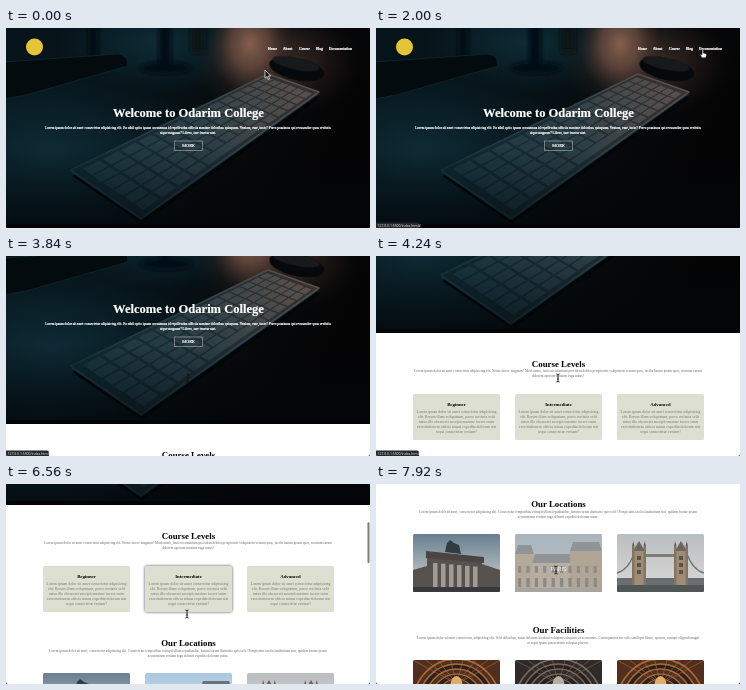
Recreate the animation shown at these times as an HTML page. Size 364 px wide and 200 px high, loop 8 s.

```html
<!DOCTYPE html>
<html lang="en">
<head>
<meta charset="utf-8">
<title>College landing page</title>
<style>
  html, body { margin: 0; width: 100%; height: 100%; overflow: hidden; background: #222; }
  svg { display: block; width: 100vw; height: 100vh; }
  text { font-family: "Liberation Serif", "Times New Roman", serif; text-anchor: middle; }
  .bold { font-weight: 700; }
  .start { text-anchor: start; }
  .sans { font-family: "Open Sans", "Noto Sans", sans-serif; }
  .lit text { stroke: #fff; stroke-width: .18; }
</style>
</head>
<body>
<svg id="stage" viewBox="0 0 364 200" xmlns="http://www.w3.org/2000/svg">
  <defs>
    <linearGradient id="desk" x2="1" y2=".3">
      <stop offset="0" stop-color="#05151b"/><stop offset=".5" stop-color="#061116"/>
      <stop offset=".8" stop-color="#070809"/><stop offset="1" stop-color="#040405"/>
    </linearGradient>
    <radialGradient id="teal"><stop stop-color="#0e2b35"/><stop offset="1" stop-color="#0e2b35" stop-opacity="0"/></radialGradient>
    <radialGradient id="warm"><stop stop-color="#85604f"/><stop offset=".45" stop-color="#6b4c40" stop-opacity=".75"/><stop offset="1" stop-color="#3a2a25" stop-opacity="0"/></radialGradient>
    <linearGradient id="floor" x2="0" y2="1"><stop offset=".6" stop-color="#02060a" stop-opacity="0"/><stop offset="1" stop-color="#02060a" stop-opacity=".6"/></linearGradient>
    <linearGradient id="board" gradientUnits="userSpaceOnUse" x1="90" y1="170" x2="290" y2="55">
      <stop stop-color="#0f2830"/><stop offset=".55" stop-color="#1d2d33"/><stop offset="1" stop-color="#37302d"/>
    </linearGradient>
    <linearGradient id="keys" gradientUnits="userSpaceOnUse" x1="90" y1="170" x2="290" y2="55">
      <stop stop-color="#173540"/><stop offset=".55" stop-color="#2d3f46"/><stop offset="1" stop-color="#57504d"/>
    </linearGradient>
    <linearGradient id="dusk" x2="0" y2="1"><stop stop-color="#687f90"/><stop offset=".6" stop-color="#aab4ba"/><stop offset="1" stop-color="#c9c2b8"/></linearGradient>
    <linearGradient id="blue" x2="0" y2="1"><stop stop-color="#a9c8df"/><stop offset="1" stop-color="#dde5e8"/></linearGradient>
    <linearGradient id="cloud" x2="0" y2="1"><stop stop-color="#b9bec1"/><stop offset="1" stop-color="#dcdad6"/></linearGradient>
    <filter id="soft"><feGaussianBlur stdDeviation=".5"/></filter>
    <filter id="blur" x="-20%" y="-20%" width="140%" height="140%"><feGaussianBlur stdDeviation="2"/></filter>
    <filter id="shadow" x="-10%" y="-20%" width="120%" height="140%"><feGaussianBlur stdDeviation="1.5"/></filter>
    <clipPath id="hero"><rect width="364" height="200"/></clipPath>
    <clipPath id="frame"><rect width="87" height="58" rx="1.5"/></clipPath>
    <clipPath id="window"><path d="M0 0H364V198Q364 200 362 200H2Q0 200 0 198Z"/></clipPath>
  </defs>
  <g clip-path="url(#window)">
    <rect width="364" height="200" fill="#fff"/>
    <g id="page"></g>
    <rect id="bar" x="361.5" width="2" height="41" rx="1" fill="#7d7d7d"/>
    <g id="status">
      <path d="M0 194.5H41Q43 194.5 43 196.5V200H0Z" fill="#25292d"/>
      <text class="start sans" x="1.5" y="198.6" font-size="3.4" fill="#f0f0f0">127.0.0.1:5500/index.html#</text>
    </g>
    <g id="cursor">
      <path id="arrow" d="M0 0V8.2L1.9 6.5 3.2 9.5 4.6 8.9 3.3 6H5.8Z" fill="#111" stroke="#fff" stroke-width=".7"/>
      <path id="hand" d="M-.6.4Q0-.6.7.4V3.2L3.4 3.9Q4 4.3 3.7 5.6L3 8H-.8L-2.4 4.9Q-2.2 4-.6 5Z" fill="#fff" stroke="#111" stroke-width=".5"/>
      <path id="beam" d="M-1.6-4Q0-4 0-3 0-4 1.6-4M0-3V3M-1.6 4Q0 4 0 3 0 4 1.6 4M-.8 1H.8" fill="none" stroke="#111" stroke-width=".9"/>
    </g>
  </g>
</svg>
<script>
const $ = id => document.getElementById(id);
const columns = [37, 139, 241];
const rect = (x, y, w, h, fill, more = '') => `<rect x="${x}" y="${y}" width="${w}" height="${h}" fill="${fill}" ${more}/>`;
const path = (d, fill, more = '') => `<path d="${d}" fill="${fill}" ${more}/>`;
const oval = (x, y, rx, ry, fill, more = '') => `<ellipse cx="${x}" cy="${y}" rx="${rx}" ry="${ry}" fill="${fill}" ${more}/>`;
const text = (x, y, size, fill, words, cls = '') => `<text x="${x}" y="${y}" font-size="${size}" fill="${fill}" class="${cls}">${words}</text>`;
const lines = (x, y, size, pitch, fill, rows) => rows.map((row, i) => text(x, y + i * pitch, size, fill, row)).join('');
const repeat = (n, draw) => Array.from({ length: n }, (_, i) => draw(i)).join('');
const mix = (a, b, k) => a.map((v, i) => v + (b[i] - v) * k);

// u runs from the near end to the far end, v across the rows.
function onBoard(u, v) {
  const depth = 1.6 * u / (1 + .6 * u);
  return mix(mix([65, 142], [135, 190], v), mix([262, 46], [313, 64], v), depth);
}

const patch = (u, v, w, h) =>
  'M' + [onBoard(u, v), onBoard(u + w, v), onBoard(u + w, v + h), onBoard(u, v + h)].join('L') + 'Z';

function keyboard() {
  const body = patch(0, 0, 1, 1);
  const keys = repeat(6, r => repeat(14, c => r === 5 && c > 3 && c < 9 ? '' : patch(.025 + c * .068, .06 + r * .15, .057, .125)));
  return `<g filter="url(#soft)">
    ${path(body, '#020608', 'transform="translate(1 6)"')}
    ${path(body, '#1c3a43', 'transform="translate(0 2)"')}
    ${path(body, 'url(#board)', 'stroke="url(#keys)" stroke-width="1.5" stroke-linejoin="round"')}
    ${path(keys + patch(.297, .81, .329, .125), 'url(#keys)')}</g>`;
}

function desk() {
  return rect(0, 0, 364, 200, 'url(#desk)')
    + oval(45, 125, 150, 85, 'url(#teal)') + oval(150, 15, 100, 50, 'url(#teal)')
    + oval(270, 35, 85, 55, 'url(#warm)', 'opacity=".4"') + oval(244, 16, 42, 52, 'url(#warm)')
    + `<g filter="url(#blur)">${rect(82, -5, 10, 35, '#041015')}${rect(153, -5, 12, 42, '#041015')}
       ${oval(160, 40, 26, 6, '#041015')}${rect(185, -5, 14, 30, '#071216')}</g>`
    + `<g filter="url(#soft)">${path('M-2 34L112 26Q122 27 122 38L20 67 -2 71Z', '#030b0f', 'stroke="#10272f" stroke-width=".8"')}</g>`
    + keyboard()
    + `<g filter="url(#soft)" transform="rotate(12 291 40)">${oval(291, 41, 28, 11, '#05090c')}${oval(289, 36, 24, 6, '#17191b')}</g>`
    + rect(0, 0, 364, 200, 'url(#floor)') + rect(0, 196, 364, 4, '#020406');
}

function hero() {
  const nav = [['Home', 262], ['About', 277], ['Course', 293], ['Blog', 310], ['Documentation', 323]];
  return `<g clip-path="url(#hero)">${desk()}</g>`
    + '<circle cx="28.5" cy="19" r="8.5" fill="#e5c437"/><g class="lit">'
    + nav.map(([label, x]) => text(x, 22.2, 3.5, '#fff', label, 'bold start')).join('')
    + text(182.5, 89.3, 12.56, '#fff', 'Welcome to Odarim College', 'bold')
    + lines(182, 101.2, 3.46, 5, '#fff', [
      'Lorem ipsum dolor sit amet consectetur adipisicing elit. Ea nihil optio ipsum accusamus id repellendus officiis maxime doloribus quisquam. Veniam, esse, iusto? Porro possimus qui recusandae quas veritatis',
      'atque magnam? Libero, iure tenetur sint.'])
    + rect(168.5, 113, 28, 9.5, 'none', 'stroke="#ccc" stroke-width=".5"')
    + text(182.5, 119.2, 4.3, '#fff', 'MORE') + '</g>';
}

const section = (y, title, rows) => text(182.5, y, 8.85, '#000', title, 'bold') + lines(182, y + 5.3, 3.46, 5, '#666', rows);

function card(x, i) {
  return (i === 1 ? `<g id="lift">${rect(x, 261, 87, 46, '#444', 'rx="2" filter="url(#shadow)"')}</g>` : '')
    + rect(x, 261, 87, 46, '#dddfd1', 'rx="1.5"')
    + text(x + 43.5, 272.6, 4.8, '#000', ['Beginner', 'Intermediate', 'Advanced'][i], 'bold')
    + lines(x + 43.5, 280, 3.9, 5, '#777', [
      'Lorem ipsum dolor sit amet consectetur adipisicing',
      'elit. Rerum illum voluptatum, porro veritatis velit',
      'natus illo obcaecati suscipit maxime facere enim',
      'exercitationem officia minus expedita dolorum nisi',
      'sequi consectetur veniam?']);
}

const photo = (x, y, art) => `<g transform="translate(${x} ${y})" clip-path="url(#frame)">${art}</g>`;

function gate() {
  return rect(0, 0, 87, 58, 'url(#dusk)')
    + path('M0 58V36L14 32V22L17 19 69 25V30L87 36V58Z', '#57514e')
    + repeat(6, i => rect(20 + i * 8, 29 + i * .7, 4.5, 25, '#a39c96'))
    + path('M13 17L71 23V29L13 24Z', '#4a4543') + path('M32 18L34 9 37 6 41 9 46 11 48 20Z', '#303d40')
    + rect(0, 53, 87, 5, '#37393c');
}

function palace() {
  const wing = (x, y, w, color) => path(`M${x} ${y + 9}L${x + 3} ${y}H${x + w - 3}L${x + w} ${y + 9}Z`, '#69727a') + rect(x, y + 9, w, 50, color);
  return rect(0, 0, 87, 58, 'url(#blue)') + wing(0, 11, 19, '#c5ac84') + wing(17, 20, 49, '#cfb993') + wing(55, 8, 32, '#bd9f75')
    + repeat(10, i => rect(3 + i * 8.4, 32, 3.2, 7, '#665b50') + rect(3 + i * 8.4, 44, 3.2, 9, '#5b5149'))
    + rect(0, 54, 87, 4, '#a69c90')
    + `<g id="veil">${rect(0, 0, 87, 58, '#aaa', 'opacity=".62"')}${text(43.5, 37, 6, '#fff', 'PARIS', 'sans')}</g>`;
}

function bridge() {
  const tower = x => rect(x, 17, 14, 42, '#a08d76') + path(`M${x + 1} 17L${x + 7} 7 ${x + 13} 17Z`, '#6a6762')
    + repeat(2, i => rect(x + i * 11.5, 12, 2.5, 46, '#85745f') + path(`M${x + i * 11.5} 12l1.2-5 1.3 5Z`, '#66615b'))
    + repeat(3, i => rect(x + 5, 22 + i * 7, 4, 4, '#5c5349'));
  return rect(0, 0, 87, 58, 'url(#cloud)') + path('M0 58V47H87V58Z', '#69706f')
    + rect(28, 20, 31, 3, '#7d7d78') + rect(0, 44, 87, 3, '#666c70')
    + path('M0 39Q11 36 17 20M70 20Q76 36 87 39', 'none', 'stroke="#667880" stroke-width="1.3"')
    + tower(15) + tower(57) + rect(0, 51, 87, 7, '#4f5655');
}

function hall(dark) {
  const [back, rib, glow] = dark ? ['#302b29', '#756960', '#b6aca0'] : ['#522e1c', '#a66c3e', '#e0ac6b'];
  return rect(0, 0, 87, 58, back)
    + repeat(6, i => oval(43.5, 45 - i, 44 - i * 6, 46 - i * 6, i % 2 ? '#2c201a' : back, `stroke="${rib}" stroke-width="${1.7 - i * .15}"`))
    + repeat(8, i => path(`M43.5 24L${i * 12.5} 0`, 'none', `stroke="${rib}" stroke-width=".6"`))
    + oval(43.5, 25, 6, 9, glow);
}

$('page').innerHTML = hero()
  + section(234, 'Course Levels', [
    'Lorem ipsum dolor sit amet consectetur adipisicing elit. Nemo facere magnam? Modi nemo, iusto accusantium provident debitis perspiciatis voluptatem veniam quas, facilis harum ipsam quos, nostrum earum',
    'dolorem aperiam maxime fuga natus?'])
  + columns.map(card).join('')
  + section(341.2, 'Our Locations', [
    'Lorem ipsum dolor sit amet, consectetur adipisicing elit. Consectetur temporibus corrupti ullam repudiandae, harum earum distinctio quis velit! Perspiciatis facilis laudantium sint, quidem beatae ipsam',
    'accusantium veniam fuga deleniti expedita dolorum natus.'])
  + [gate, palace, bridge].map((art, i) => photo(columns[i], 368, art())).join('')
  + section(467.2, 'Our Facilities', [
    'Lorem ipsum dolor sit amet consectetur, adipisicing elit. Velit doloribus, natus dolorum incidunt voluptates aliquam sit accusamus. Consequuntur iste odio similique libero, quaerat, cumque eligendi magni',
    'ut sequi ipsam praesentium voluptas placeat.'])
  + columns.map((x, i) => photo(x, 494, hall(i === 1))).join('');

// Each track is a list of [time, ...values].
const scroll = [[3680, 0], [3760, 6], [3840, 32], [3920, 70], [4000, 100], [4080, 118], [4160, 118], [4240, 123], [4400, 148],
  [4560, 168], [4640, 171], [6320, 171], [6400, 173], [6560, 179], [6640, 195], [6800, 258], [6960, 300], [7120, 316], [7200, 318]];
const pointer = [[160, 259, 42], [1040, 272, 22], [1120, 273, 21], [1920, 334, 21], [2400, 290, 26], [2960, 234.5, 58],
  [3680, 182, 122], [4720, 182, 122], [4960, 182.5, 103], [5520, 182.5, 103], [6320, 181, 130], [7200, 181, 130], [7600, 180, 86]];
const shapes = [[0, 'arrow'], [1040, 'hand'], [2160, 'arrow'], [3680, 'beam'], [4800, 'arrow'], [6240, 'beam']];
const lift = [[4240, 0], [4480, 1], [6560, 1], [6720, 0]];
const veil = [[7120, 0], [7440, 1]];
const bar = [[5440, 0], [5520, 1], [7280, 1], [7520, 0]];

function at(track, t) {
  const next = track.findIndex(step => step[0] > t);
  if (next < 1) return track.at(next).slice(1);
  const [a, b] = [track[next - 1], track[next]];
  return mix(a.slice(1), b.slice(1), (t - a[0]) / (b[0] - a[0]));
}

const fade = (id, value) => $(id).setAttribute('opacity', value);

function draw(now) {
  const t = Math.floor(now % 8000 / 80) * 80;
  const [top] = at(scroll, t);
  const shape = shapes.findLast(step => step[0] <= t)[1];
  $('page').setAttribute('transform', `translate(0 ${-top})`);
  $('cursor').setAttribute('transform', `translate(${at(pointer, t)})`);
  for (const id of ['arrow', 'hand', 'beam']) fade(id, +(id === shape));
  fade('lift', at(lift, t)[0]);
  fade('veil', at(veil, t)[0]);
  fade('bar', at(bar, t)[0]);
  fade('status', +(t >= 1280 && t < 4560));
  $('bar').setAttribute('y', 1.5 + top * .206);
}

const begin = performance.now();
function tick() {
  draw(performance.now() - begin);
  requestAnimationFrame(tick);
}
tick();
</script>
</body>
</html>
```
